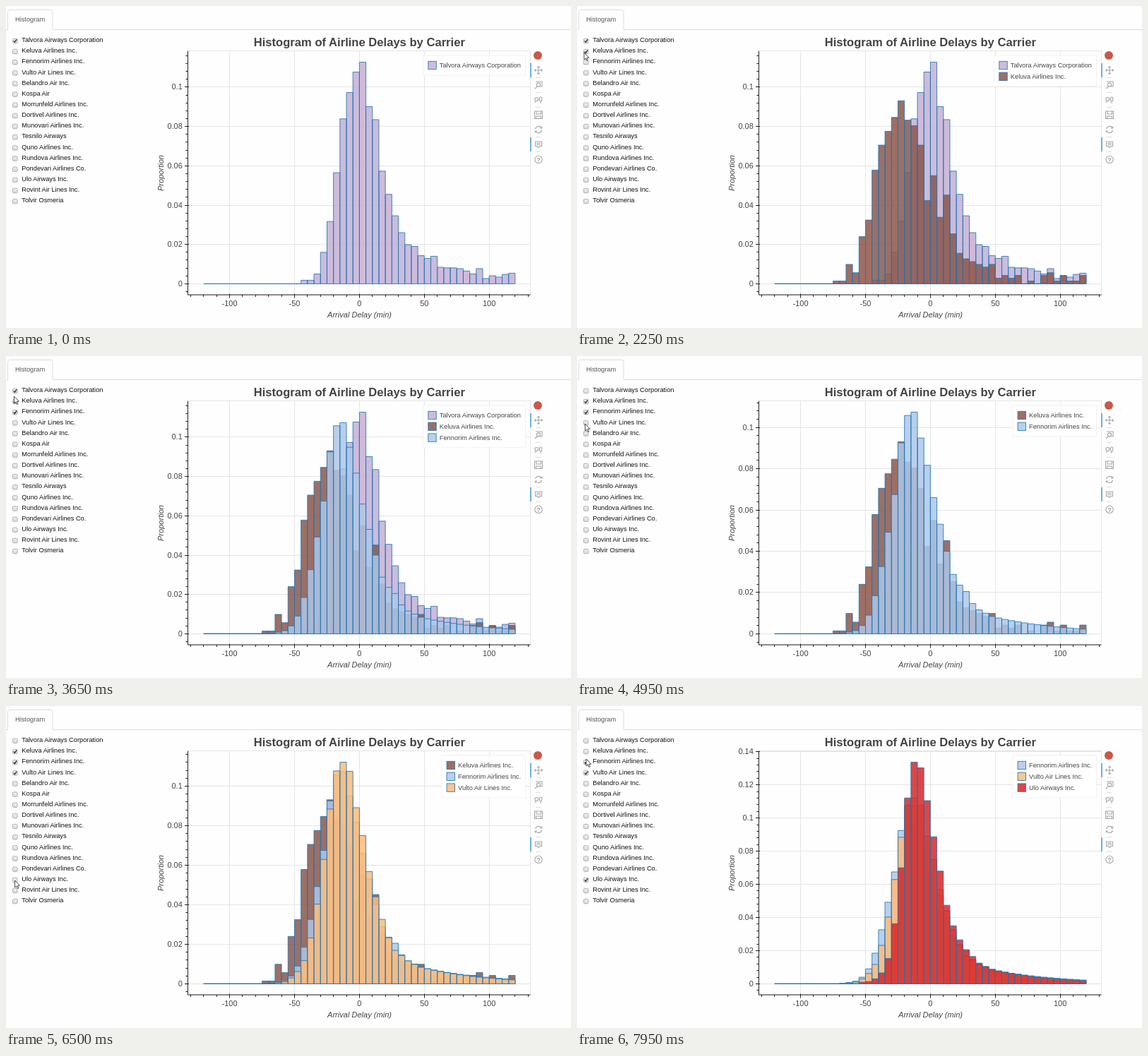
Recreate the animation shown at these times as an HTML page. Size 800 px wide and 456 px high, loop 8 s.

```html
<!DOCTYPE html>
<html lang="en">
<head>
<meta charset="utf-8">
<title>Histogram</title>
<style>
  html, body { margin: 0; width: 100%; height: 100%; overflow: hidden; background: #fefefe; }
  svg { display: block; width: 800px; height: 456px; font-family: "Liberation Sans", Arial, sans-serif; }
  .small { font-size: 9.25px; }
  .tick { font-size: 11px; fill: #444; }
  .label { font-size: 11.07px; font-style: italic; fill: #444; }
  .icon { fill: none; stroke: #a6a6a6; stroke-width: 1.1; }
</style>
</head>
<body>
<svg id="stage" viewBox="0 0 800 456">
  <defs>
    <linearGradient id="box" x2="0" y2="1">
      <stop offset="0" stop-color="#f1f1f1"/><stop offset="1" stop-color="#d9d9d9"/>
    </linearGradient>
  </defs>
  <path d="M0 33.5H2.5V8.5Q2.5 5.5 5.5 5.5H63Q66 5.5 66 8.5V33.5H800" fill="none" stroke="#ddd"/>
  <text class="small" x="13" y="22.3" fill="#555">Histogram</text>
  <g id="list" class="small"></g>

  <g id="grid"></g>
  <rect x="257.5" y="63.5" width="485" height="345.5" fill="none" stroke="#e5e5e5"/>
  <g id="bars" stroke="#1f77b4" stroke-width=".85"></g>
  <g id="axes"></g>
  <text x="500.3" y="56.6" text-anchor="middle" font-size="16.6" font-weight="bold" fill="#444">Histogram of Airline Delays by Carrier</text>
  <text class="label" x="500.5" y="441" text-anchor="middle">Arrival Delay (min)</text>
  <text class="label" transform="translate(222.5 236.5) rotate(-90)" text-anchor="middle">Proportion</text>
  <g id="legend" class="small"></g>

  <circle cx="753" cy="70" r="6" fill="#c8584a"/>
  <path d="M743 81V101M743 186V206" stroke="#4ba3d9" stroke-width="1.6"/>
  <path d="M750 101.5h7M750 122.5h7M750 143.5h7M750 185.5h7M750 206.5h7" stroke="#ddd"/>
  <g class="icon">
    <path d="M748.5 91H759.5M754 85.500V96.500M752.500 87L754 85.500 755.500 87M752.500 95L754 96.500 755.500 95M750 89.500L748.500 91 750 92.500M758 89.500L759.500 91 758 92.500"/>
    <path d="M750 107H759V114H756M749 117L752 114"/><circle cx="754" cy="111.500" r="2.600"/>
    <circle cx="751.300" cy="132" r="2.500"/><path d="M749 137L750.500 134.500"/><rect x="755.500" y="129" width="3.200" height="6" rx="1.600"/><path d="M757 135V138"/>
    <path d="M748.500 149H759.500V159.500H748.500ZM751 149V153H757.500V149M750.500 159V156H757.500V159"/>
    <path d="M749.500 174A4.700 4.700 0 0 1 758 172.500M758.500 176A4.700 4.700 0 0 1 750 177.500M756 173H758.700V170.500M752 177H749.300V179.500"/>
    <path d="M749.500 192H758.500V198.500H756L754 200.500 752 198.500H749.500ZM751 194.200H757M751 196.300H757"/>
    <circle cx="754" cy="217.500" r="5.200"/>
  </g>
  <text x="754" y="220.800" text-anchor="middle" font-size="9" font-weight="bold" fill="#a0a0a0">?</text>
  <path id="cursor" d="M0 0V10L2.300 7.900 3.900 11.500 5.500 10.800 3.900 7.300H7Z" fill="#fff" stroke="#222" stroke-width=".8" visibility="hidden"/>
</svg>
<script>
const names = [
  "Talvora Airways Corporation", "Keluva Airlines Inc.", "Fennorim Airlines Inc.", "Vulto Air Lines Inc.",
  "Belandro Air Inc.", "Kospa Air", "Morrunfeld Airlines Inc.", "Dortivel Airlines Inc.",
  "Munovari Airlines Inc.", "Tesnilo Airways", "Quno Airlines Inc.", "Rundova Airlines Inc.",
  "Pondevari Airlines Co.", "Ulo Airways Inc.", "Rovint Air Lines Inc.", "Tolvir Osmeria"
];
const BINS = 48, LOOP = 8000, STEP = 50;

// Heights from bin `first` on; an optional [from, to] tail decays to the last bin.
function series(first, unit, head, tail) {
  const v = Array(first).fill(0).concat(head);
  if (tail) {
    const n = BINS - v.length;
    for (let i = 0; i < n; i++) v.push(tail[0] * (tail[1] / tail[0]) ** (i / (n - 1)));
  }
  return v.map(x => x * unit);
}
const carriers = {
  0: { color: "#c5b0d5", data: series(15, 1e-4, [18, 18, 50, 160, 317, 565, 839, 973, 1077, 1127, 901,
    835, 573, 455, 346, 260, 199, 190, 143, 129, 140, 84, 81, 81, 77, 65, 50, 77, 27, 41, 34, 48, 54]) },
  1: { color: "#8c564b", data: series(9, 1 / 709, [1, 1, 7, 4, 17, 23, 41, 50, 55, 60, 66, 59, 57, 50, 30,
    39, 24, 32, 18, 11, 9, 8, 7, 6, 7, 2, 3, 2, 3, 0, 1, 0, 3, 4, 1, 3, 1, 1, 3]) },
  2: { color: "#aec7e8", data: series(10, 1e-4, [3, 8, 16, 40, 90, 185, 326, 492, 675, 925, 1058, 1074,
    949, 817, 660, 531, 400, 288, 236, 205, 147, 116, 100], [84, 23]) },
  3: { color: "#ffbb78", data: series(11, 1e-4, [5, 10, 30, 62, 117, 232, 403, 629, 884, 1077, 1121, 1075,
    891, 750, 568, 440, 326, 233, 169, 143, 116, 98], [84, 20]) },
  13: { color: "#d62728", data: series(13, 1e-4, [10, 14, 30, 66, 153, 363, 700, 1121, 1337, 1303, 1105,
    887, 680, 474, 350, 265, 205, 165, 125, 105], [88, 18]) }
};

// [time, carrier toggled]
const clicks = [[2050, 1], [3000, 2], [4000, 0], [5400, 3], [6700, 13], [7500, 1]];
// [time, x, y] of the pointer tip
const path = [
  [1250, 200, 250], [1700, 10, 66], [2400, 10, 66], [2800, 11, 81], [3400, 11, 81], [3650, 11.5, 57],
  [3800, 12, 50], [4250, 12, 50], [4800, 11.5, 96], [5700, 11.5, 96], [6450, 12.5, 247],
  [6850, 12.5, 247], [7300, 11, 66], [7700, 11, 66], [7950, 13, 75]
];

const $ = id => document.getElementById(id);
function add(parent, tag, attrs, text) {
  const el = document.createElementNS("http://www.w3.org/2000/svg", tag);
  for (const k in attrs) el.setAttribute(k, attrs[k]);
  if (text !== undefined) el.textContent = text;
  return parent.appendChild(el);
}
const line = (g, d, stroke, width = 1) => add(g, "path", { d, stroke, "stroke-width": width, fill: "none" });

const LEFT = 257.5, RIGHT = 742.5, TOP = 63.8, BASE = 409, ZERO = 393.4;
const px = min => 500.4 + min * 1.8378;
const snap = v => Math.round(v - 0.5) + 0.5;

const ticks = names.map((name, i) => {
  const y = 48 + i * 15.15;
  add($("list"), "rect", { x: 9.5, y: y - 1.8, width: 6.6, height: 6.4, rx: 1.3, fill: "url(#box)", stroke: "#aaa", "stroke-width": 0.9 });
  add($("list"), "text", { x: 22.3, y: y + 3.1, fill: "#111" }, name);
  return line($("list"), `M10.800 ${y + 1.4}l1.600 1.800l2.800 -4`, "#333", 1.4);
});

function drawAxes(scale) {
  const grid = $("grid"), axes = $("axes");
  grid.replaceChildren();
  axes.replaceChildren();
  let g = "", major = `M${LEFT} ${TOP}V${BASE}M${LEFT} ${BASE}H${RIGHT}`, minor = "";
  for (let m = -130; m <= 130; m += 10) {
    const x = snap(px(m));
    if (m % 50) { minor += `M${x} ${BASE}v3`; continue; }
    g += `M${x} ${TOP}V${BASE}`;
    major += `M${x} ${BASE - 1.5}v6`;
    add(axes, "text", { class: "tick", x: px(m), y: 425, "text-anchor": "middle" }, m);
  }
  for (let k = -3; ZERO - k * 0.004 * scale >= TOP; k++) {
    const y = snap(ZERO - k * 0.004 * scale);
    if (y > BASE) continue;
    if (k % 5) { minor += `M${LEFT} ${y}h-3`; continue; }
    g += `M${LEFT} ${y}H${RIGHT}`;
    major += `M${LEFT + 1.5} ${y}h-6`;
    add(axes, "text", { class: "tick", x: 249.8, y: y + 3.7, "text-anchor": "end" }, +(k * 0.004).toFixed(2));
  }
  line(grid, g, "#e5e5e5");
  line(axes, major, "#222");
  line(axes, minor, "#222");
}

function drawBars(on, scale) {
  $("bars").replaceChildren();
  for (const id of on) {
    const d = carriers[id].data.map((v, i) => {
      const x = px(i * 5 - 120);
      return `M${x} ${ZERO}V${ZERO - v * scale}H${px(i * 5 - 115)}V${ZERO}Z`;
    }).join("");
    add($("bars"), "path", { d, fill: carriers[id].color, "fill-opacity": 0.85 });
  }
}

function drawLegend(on) {
  const g = $("legend");
  g.replaceChildren();
  const frame = add(g, "rect", { y: 70, height: 12.3 + on.length * 15.8, fill: "#fff", "fill-opacity": 0.95, stroke: "#e5e5e5", "stroke-opacity": 0.5 });
  const labels = on.map((id, i) => add(g, "text", { y: 87 + i * 15.8, fill: "#444" }, names[id]));
  const x = 729 - Math.max(...labels.map(l => l.getComputedTextLength()));
  labels.forEach((l, i) => {
    l.setAttribute("x", x);
    add(g, "rect", { x: x - 16, y: 78.3 + i * 15.8, width: 11.4, height: 11.4, fill: carriers[on[i]].color, "fill-opacity": 0.85, stroke: "#1f77b4", "stroke-width": 0.85 });
  });
  frame.setAttribute("x", x - 23);
  frame.setAttribute("width", 758.5 - x);
}

function selected(t) {
  const on = new Set([0]);
  for (const [at, id] of clicks) if (t >= at && !on.delete(id)) on.add(id);
  return [...on].sort((a, b) => a - b);
}

function moveCursor(t) {
  const cursor = $("cursor");
  cursor.setAttribute("visibility", t < path[0][0] ? "hidden" : "visible");
  let i = path.findIndex(p => p[0] > t);
  if (i === 0) return;
  if (i < 0) i = path.length - 1;
  const [t0, x0, y0] = path[i - 1], [t1, x1, y1] = path[i];
  const u = Math.min(1, (t - t0) / (t1 - t0)), e = u * u * (3 - 2 * u);
  cursor.setAttribute("transform", `translate(${x0 + (x1 - x0) * e} ${y0 + (y1 - y0) * e})`);
}

let shown = "";
const start = performance.now();
function frame() {
  const t = Math.floor((performance.now() - start) % LOOP / STEP) * STEP;
  const on = selected(t), key = on.join();
  if (key !== shown) {
    shown = key;
    const scale = 345.2 / (1.1 * Math.max(...on.flatMap(id => carriers[id].data)));
    drawAxes(scale);
    drawBars(on, scale);
    drawLegend(on);
    ticks.forEach((el, i) => el.setAttribute("visibility", on.includes(i) ? "visible" : "hidden"));
  }
  moveCursor(t);
  requestAnimationFrame(frame);
}
frame();
</script>
</body>
</html>
```
